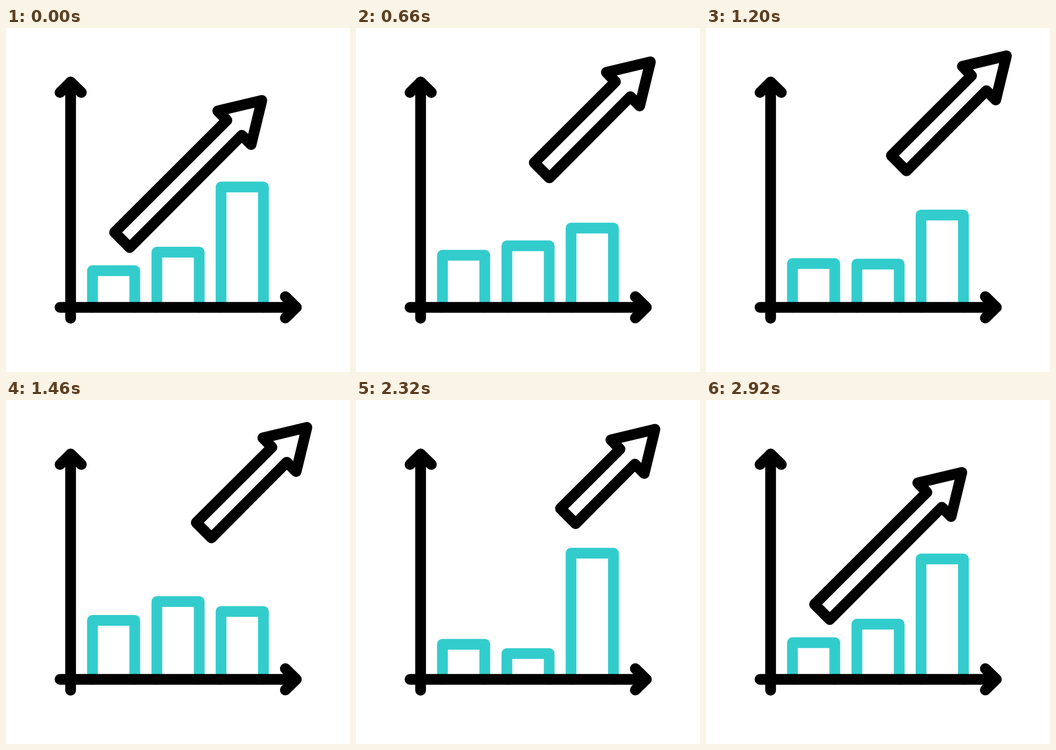
An HTML page with a canvas that plays this animation: 640x640 px, repeating every 3.16 s.

```html
<!DOCTYPE html>
<html lang="en">
<head>
<meta charset="utf-8">
<title>Growth chart</title>
<style>
  html, body { margin: 0; width: 100%; height: 100%; overflow: hidden; background: #fff; }
  canvas { display: block; width: 640px; height: 640px; }
</style>
</head>
<body>
<canvas id="stage" width="640" height="640"></canvas>
<script>
const ctx = document.getElementById('stage').getContext('2d');
const LOOP = 3160, STEP = 20;
const TEAL = '#33cccc', BLACK = '#000';

const ease = p => (1 - Math.cos(Math.PI * Math.min(1, Math.max(0, p)))) / 2;

// Eased value between [time, value] keys.
function track(keys, t) {
  if (t <= keys[0][0]) return keys[0][1];
  for (let i = 1; i < keys.length; i++) {
    const [t0, v0] = keys[i - 1], [t1, v1] = keys[i];
    if (t <= t1) return v0 + (v1 - v0) * ease((t - t0) / (t1 - t0));
  }
  return keys[keys.length - 1][1];
}

const beats = [0, 380, 980, 1620, 2260, 2920];
const bars = [
  { x: 160.8, top: 451.5, moves: [0, -51.5, -0.5, -48.5, 3, 0] },
  { x: 280.7, top: 417, moves: [0, -62.5, 51, -58, 56, 0] },
  { x: 400.1, top: 295.7, moves: [0, 112.5, 32, 109, -11, 0] }
];
for (const bar of bars) bar.keys = beats.map((time, i) => [time, bar.moves[i]]);

const drift = [[400, 78], [920, 81.3], [1460, 77.3], [1800, 77.6], [2320, 81]];
const shorten = [[0, 0], [300, 59], [960, 57], [2400, 98.5], [2860, 0]];

function line(points, color, closed) {
  ctx.beginPath();
  points.forEach(([x, y]) => ctx.lineTo(x, y));
  if (closed) ctx.closePath();
  ctx.strokeStyle = color;
  ctx.stroke();
}

function drawBar(bar, t) {
  const y = bar.top + track(bar.keys, t), right = bar.x + 78.8;
  line([[bar.x, 520], [bar.x, y], [right, y], [right, 520]], TEAL);
}

function drawAxes() {
  line([[120.2, 540], [120.2, 100.5]], BLACK);
  line([[100.5, 120], [120.2, 100.5], [140.2, 120]], BLACK);
  line([[100.5, 519.7], [540, 519.7]], BLACK);
  line([[519.7, 499.7], [540, 519.7], [519.7, 539.5]], BLACK);
}

function drawArrow(t) {
  const shake = 13 * Math.sin(2 * Math.PI * (t - 435) / 251);
  const presence = ease(t / 240) * (1 - ease((t - 2390) / 450));
  const d = presence * (track(drift, t) + shake);
  const s = d + track(shorten, t);
  line([
    [476 + d, 134.7 - d],
    [394 + d, 154.3 - d],
    [411 + d, 171.7 - d],
    [202 + s, 380.2 - s],
    [230.2 + s, 408.5 - s],
    [438.7 + d, 199.5 - d],
    [456 + d, 217 - d]
  ], BLACK, true);
}

function draw(now) {
  const t = Math.floor((now % LOOP) / STEP) * STEP;
  ctx.fillStyle = '#fff';
  ctx.fillRect(0, 0, 640, 640);
  ctx.lineWidth = 20;
  ctx.lineCap = ctx.lineJoin = 'round';
  for (const bar of bars) drawBar(bar, t);
  drawAxes();
  drawArrow(t);
}

let start;
function tick(now) {
  if (start === undefined) start = now;
  draw(now - start);
  requestAnimationFrame(tick);
}
draw(0);
requestAnimationFrame(tick);
</script>
</body>
</html>
```
